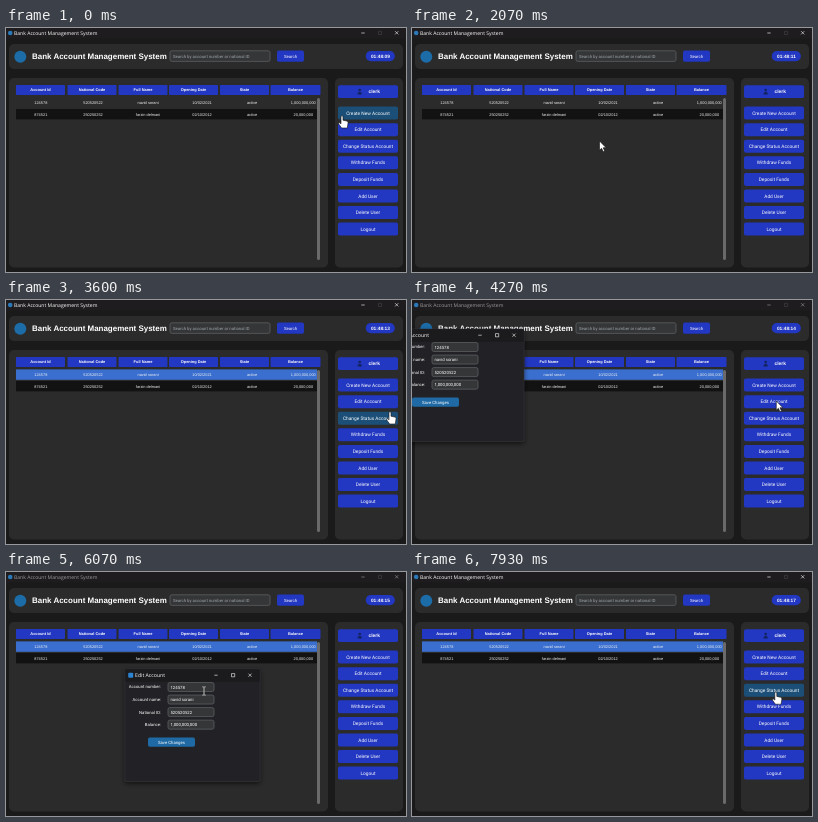
An HTML page that plays this animation: 400x244 px, repeating every 8000 ms.

```html
<!DOCTYPE html>
<html lang="en">
<head>
<meta charset="utf-8">
<title>Bank Account Management System</title>
<style>
  html, body { margin: 0; width: 100%; height: 100%; overflow: hidden; background: #1a1a1b; }
  svg { display: block; width: 100%; height: 100%; }
  text { text-rendering: geometricPrecision; white-space: pre; }
  .ui { font-family: Roboto, sans-serif; }
  .cell { font-family: "Liberation Sans", Arial, sans-serif; }
  .bold { font-family: "Liberation Sans", Arial, sans-serif; font-weight: bold; }
  .caption { font-family: "Open Sans", sans-serif; }
</style>
</head>
<body>
<svg id="stage" viewBox="0 0 400 244" preserveAspectRatio="none"></svg>
<script>
const LOOP = 8000;
const BLUE = '#2237c2', HOVER = '#1b4f78', PANEL = '#2b2b2c', ROW_SELECTED = '#3a6fd0';
const CUSTOMER = 'navid sorani';

const rect = (x, y, w, h, fill, r = 0, extra = '') =>
  `<rect x="${x}" y="${y}" width="${w}" height="${h}" rx="${r}" fill="${fill}" ${extra}/>`;
const text = (str, x, y, size, style = 'ui', anchor = 'middle', fill = '#fff', extra = '') =>
  `<text class="${style}" x="${x}" y="${y + size * 0.35}" font-size="${size}" text-anchor="${anchor}" fill="${fill}" ${extra}>${str}</text>`;
const button = (label, x, y, w, h, size, fill = BLUE, id = '') =>
  rect(x, y, w, h, fill, 1.8, id && `id="${id}"`) + text(label, x + w / 2, y + h / 2, size);
const entry = (x, y, w, h) =>
  rect(x, y, w, h, '#343638', 1.8, 'stroke="#606568" stroke-width=".7"');
const cross = (x, y, r = 1.6) => `M${x - r} ${y - r}l${2 * r} ${2 * r}m0 ${-2 * r}l${-2 * r} ${2 * r}`;
const strokes = (d, color, extra = '') =>
  `<path d="${d}" fill="none" stroke="${color}" stroke-width=".6" ${extra}/>`;

// Main window
const actions = ['Create New Account', 'Edit Account', 'Change Status Account', 'Withdraw Funds',
  'Deposit Funds', 'Add User', 'Delete User', 'Logout'];
const actionTop = i => 78.6 + i * 16.57;

const columns = [
  ['Account Id', 10, 49, 34.8], ['National Code', 61.5, 49, 87], ['Full Name', 112.5, 49, 142],
  ['Opening Date', 163, 49, 196], ['State', 214, 49, 246], ['Balance', 264.5, 50, 297.3]
];
const rows = [
  ['124578', '520520522', CUSTOMER, '10/02/2021', 'active', '1,000,000,000'],
  ['874521', '250250252', 'farzin delmani', '02/10/2012', 'active', '20,000,000']
];

const titleBar =
  rect(0, 0, 400, 10.5, '#1f1c1f') +
  `<circle cx="4.2" cy="5" r="2.3" fill="#2a78b8"/>` +
  `<g id="caption">` +
  text('Bank Account Management System', 8, 4.8, 5.07, 'caption', 'start') +
  strokes('M355.3 5h3.4' + cross(390.7, 4.8), '#fff') + `</g>` +
  strokes('M372.5 3.3h3.2v3.2h-3.2z', '#454345');

const header =
  rect(3, 16, 394, 25, PANEL, 5) +
  `<circle cx="14.3" cy="28.8" r="6" fill="#1c6ca8"/>` +
  text('Bank Account Management System', 26, 28, 7.98, 'bold', 'start') +
  entry(164, 22.8, 100, 10.6) +
  text('Search by account number or national ID', 167, 28.1, 4.25, 'ui', 'start', '#a2a5a8') +
  button('Search', 271, 22.6, 27, 11.2, 4.3) +
  rect(359.8, 23, 29, 10.2, BLUE, 5) +
  text('', 374.4, 28.1, 4.75, 'bold', 'middle', '#fff', 'id="clock"');

const table =
  rect(3, 50, 319, 189.5, PANEL, 5) +
  columns.map(([name, x, w]) => rect(x, 57, w, 10, BLUE, .8) + text(name, x + w / 2, 62, 3.95, 'bold')).join('') +
  rect(10, 69.4, 301, 10.4, 'none', 0, 'id="firstRow"') +
  rect(10, 81, 301, 10.4, '#121212') +
  rows.map((row, r) => row.map((value, c) =>
    text(value, columns[c][3], 74.4 + r * 11.8, 3.92, 'cell', 'middle', '#f0f0f0')).join('')).join('') +
  rect(311, 70, 3, 162, '#6a6a6a', 1.5, 'id="scrollbar"');

const sidebar =
  rect(329, 50, 68, 189.5, PANEL, 5) +
  rect(332, 57.2, 60, 12.8, BLUE, 1.8) +
  `<g fill="#14235f"><circle cx="353.7" cy="62" r="1.3"/><path d="M351.8 66.5v-1.2q0-1.6 1.9-1.6t1.9 1.6v1.2z"/></g>` +
  text('clerk', 368.2, 63.6, 4.9, 'bold') +
  actions.map((label, i) => button(label, 332, actionTop(i), 60, 13, 4.8, BLUE, 'action' + i)).join('');

// Pop-up windows; the form is drawn relative to its own top left corner
const shadow = 'filter="url(#shadow)"';
const errorDialog =
  `<g id="errorDialog">` +
  rect(90, 81, 133, 65.8, '#232324', 1.5, `stroke="#3d3d3f" stroke-width=".5" ${shadow}`) +
  rect(90.3, 81.3, 132.4, 10, '#1d1d20', 1.2) +
  text('Error', 94, 86.2, 4.3, 'ui', 'start', '#283c9c') +
  strokes(cross(218, 86.2, 1.2), '#45494c') +
  `<path d="M131.8 104.2L140.2 118.2H123.8Z" fill="#f3b52c" stroke="#f8d37c" stroke-width="1.6" stroke-linejoin="round"/>` +
  `<path d="M131.8 108.2v5.2m0 1.6v1.5" stroke="#4c3210" stroke-width="1.6"/>` +
  text('Please select an account', 143, 111.7, 4.22, 'ui', 'start') +
  button('OK', 165, 133, 54.5, 10.6, 4.3, BLUE, 'okButton') + `</g>`;

const fields = [['Account number:', '124578'], ['Account name:', CUSTOMER],
  ['National ID:', '520520522'], ['Balance:', '1,000,000,000']];
const editForm =
  `<g id="editForm">` +
  rect(0, 0, 135, 112.5, '#242425', 1.5, `stroke="#363638" stroke-width=".5" ${shadow}`) +
  rect(.3, .3, 134.4, 12.4, '#1b1a1c', 1.2) +
  rect(3.2, 3.7, 5, 5, '#2c83d0', 1) +
  text('Edit Account', 10, 6.2, 5.2, 'caption', 'start') +
  strokes('M89.3 6.2h3.4M106.5 4.6h3.2v3.2h-3.2z' + cross(125, 6.2), '#fff') +
  fields.map(([label, value], i) => {
    const y = 18 + i * 12.55;
    return text(label, 36, y, 4.25, 'ui', 'end') + entry(43, y - 4.5, 46, 9) +
      text(value, 45.4, y, 4.3, 'ui', 'start');
  }).join('') +
  button('Save Changes', 23, 68.6, 47, 9.2, 4.3, '#1f6aa5') + `</g>`;

const cursors =
  `<g id="cursor" stroke-linejoin="round" stroke="#111" stroke-width=".6" fill="#fff">
    <path id="arrow" d="M0 0V9.2L2.1 7.3L3.7 10.8L5.2 10.1L3.7 6.7H6.6Z"/>
    <path id="hand" d="M-1 .8Q-1-.2 0-.2T1 .8V4.2L5 5.1Q6.2 5.5 6.1 6.8L5.3 12H-.4L-3.2 8.1Q-3.8 6.9-2.7 6.6L-1 7.8Z"/>
    <path id="beam" d="M-2-4.6H-.4L0-4.2L.4-4.6H2V-3.7H.5V3.7H2V4.6H.4L0 4.2L-.4 4.6H-2V3.7H-.5V-3.7H-2Z" stroke-width=".25"/>
  </g>`;

document.getElementById('stage').innerHTML =
  `<defs><filter id="shadow" x="-20%" y="-20%" width="140%" height="140%">
    <feDropShadow dx="0" dy="2" stdDeviation="2.5" flood-color="#000" flood-opacity=".6"/></filter></defs>` +
  rect(0, 0, 400, 244, '#1a1a1b') + titleBar + header + table + sidebar + errorDialog + editForm + cursors;

const el = id => document.getElementById(id);
const show = (id, on) => el(id).setAttribute('display', on ? 'inline' : 'none');
const paint = (id, fill) => el(id).setAttribute('fill', fill);

// Pointer stops: time, x, y
const route = [
  [0, 336, 88], [120, 336, 88], [460, 354, 102], [900, 356, 104], [1130, 355, 111],
  [1650, 192, 138], [1900, 190, 137], [2070, 187.5, 113], [2450, 142, 75], [2760, 142, 75],
  [3420, 378, 111], [3600, 384, 112], [3850, 366, 101], [4400, 364, 101], [5150, 41, 34],
  [5270, 41, 34], [5930, 183, 102], [6070, 198, 119], [6500, 200, 119], [7000, 244, 103],
  [7220, 244, 103], [7750, 363, 119], [8000, 364, 120.5]
];
const ease = p => p * p * (3 - 2 * p);

function pointerAt(t) {
  const i = route.findIndex(stop => stop[0] > t);
  const [t0, x0, y0] = route[i - 1], [t1, x1, y1] = route[i];
  const p = ease((t - t0) / (t1 - t0));
  return [x0 + (x1 - x0) * p, y0 + (y1 - y0) * p];
}

function draw(t) {
  const [x, y] = pointerAt(t);
  const over = (left, top, w, h) => x >= left && x <= left + w && y >= top && y <= top + h;
  const errorOpen = t >= 700 && t < 1940;
  const editOpen = t >= 4080 && t < 7180;
  const active = !errorOpen && !editOpen;

  const [dragX, dragY] = pointerAt(Math.min(Math.max(t, 5270), 5930));
  const formX = dragX - 64, formY = dragY - 5;

  show('errorDialog', errorOpen);
  show('editForm', editOpen);
  el('editForm').setAttribute('transform', `translate(${formX} ${formY})`);
  el('caption').setAttribute('opacity', active ? 1 : .55);
  el('clock').textContent = '01:48:' + String(10 + Math.floor((t - 200) / 1000)).padStart(2, '0');
  paint('firstRow', t >= 2680 ? ROW_SELECTED : PANEL);
  paint('scrollbar', active && over(310, 70, 5, 162) ? '#858585' : '#6a6a6a');

  let onButton = false;
  actions.forEach((_, i) => {
    const hovered = active && over(332, actionTop(i), 60, 13);
    onButton ||= hovered;
    paint('action' + i, hovered ? HOVER : BLUE);
  });
  const onOk = errorOpen && over(165, 133, 54.5, 10.6);
  paint('okButton', onOk ? HOVER : BLUE);

  const onField = editOpen && fields.some((_, i) => over(formX + 43, formY + 13 + i * 12.55, 46, 10));
  const shape = onButton || onOk ? 'hand' : onField ? 'beam' : 'arrow';
  ['arrow', 'hand', 'beam'].forEach(id => show(id, id === shape));
  el('cursor').setAttribute('transform', `translate(${x} ${y})`);
}

const start = performance.now();
function tick() {
  draw((performance.now() - start) % LOOP);
  requestAnimationFrame(tick);
}
tick();
</script>
</body>
</html>
```
